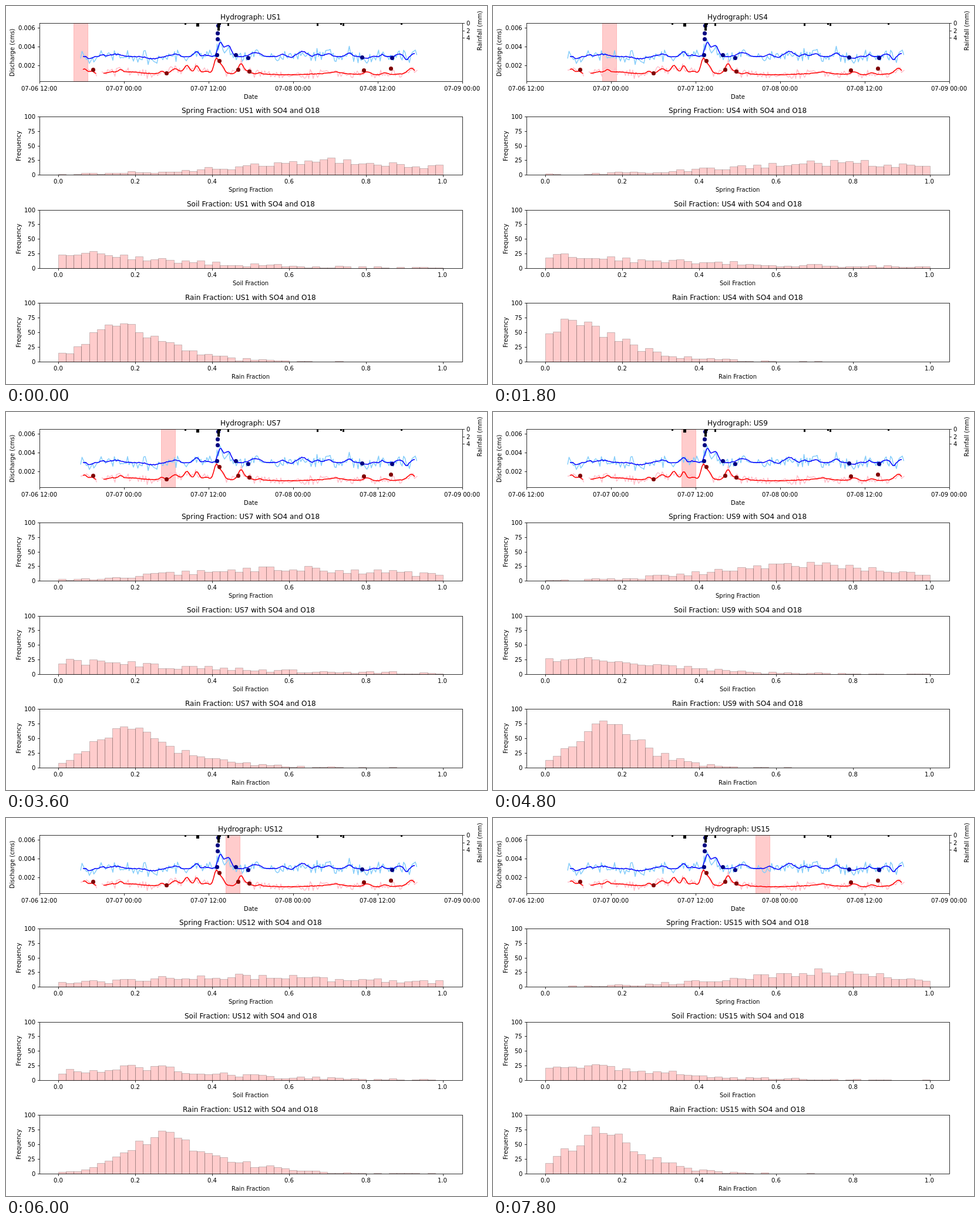
An HTML page with a canvas that plays this animation: 819 px wide and 643 px high, repeating every 8000 ms.

```html
<!DOCTYPE html>
<html lang="en">
<head>
<meta charset="utf-8">
<title>Hydrograph</title>
<style>
html, body { margin: 0; width: 100%; height: 100%; overflow: hidden; background: #fff; }
canvas { display: block; }
</style>
</head>
<body>
<canvas width="819" height="643"></canvas>
<script>
const ctx = document.querySelector('canvas').getContext('2d');
const LOOP = 8000, STEP = 600, BINS = 50;
const LEFT = 56.5, WIDTH = 720, HEIGHT = 99.2;
const chartTop = row => 29.25 + 158.7 * row;

// Key steps; the steps between them are interpolated
const keySteps = [0, 2, 5, 8, 10, 12, 13];
const bandX = [[115], [162], [235], [321], [374], [426], [447]];

// Histogram humps at the key steps: peak position, peak count, left and right width
const charts = [
  { name: 'Spring', humps: [
    [.74, 23, .28, .45], [.93, 22, .33, .2], [.6, 19, .33, .5], [.69, 27, .25, .37],
    [.5, 18, .32, .55], [.66, 25, .28, .33], [.74, 25, .25, .33]] },
  { name: 'Soil', humps: [
    [.06, 26, .07, .32], [.05, 20, .08, .48], [.02, 19, .1, .55], [.13, 28, .2, .24],
    [.24, 21, .25, .28], [.12, 30, .1, .2], [.12, 27, .12, .25]] },
  { name: 'Rain', humps: [
    [.17, 70, .087, .135], [.04, 74, .1, .13], [.19, 62, .085, .18], [.18, 78, .1, .1],
    [.28, 64, .1, .17], [.26, 79, .095, .125], [.16, 76, .09, .115]] }];

// Smoothed discharge: a base level with bumps of x, height, width
const blueFlow = bumps(86, [
  [143, -4, 5], [163, 3, 4], [185, 4, 14], [250, -4, 12], [288, 4, 10], [324, 9, 6],
  [340, 3, 6], [365, 23, 6], [378, 19, 7.5], [425, 7, 12], [470, 4, 6], [486, -2, 3],
  [505, 9, 10], [530, 4, 6], [548, 5, 8], [584, 6, 7], [612, -3, 8], [640, 4, 4],
  [670, 5, 7], [682, -6, 4], [695, 5, 6]]);
const redFlow = bumps(115, [
  [133, 8, 7], [146, 4, 5], [180, 3, 9], [195, 6, 6], [213, 3, 18], [265, 4, 5],
  [288, 8, 9], [308, 14, 7], [325, 14, 5], [340, 4, 8], [358, 25, 5.5], [367, 14, 6],
  [400, 17, 6.5], [412, 4, 6], [432, 2, 4], [480, -2, 40], [560, 3, 14], [615, 5, 8],
  [630, -2, 40], [645, 3, 6], [690, 9, 9]]);

const blueDots = [[361, 33], [360, 46], [360, 56], [359, 83], [391, 83], [412, 88], [606, 87], [657, 88]];
const redDots = [[148, 108], [273, 114], [363, 93], [395, 108], [414, 111], [609, 109], [655, 106]];
const rainBars = [
  [304, 3, 3], [324, 5, 6], [360, 4, 13], [363, 3, 3], [377, 3, 5],
  [529, 3, 5], [569, 3, 3], [573, 3, 5], [672, 3, 3]];

const curves = [
  ['#87cefa', trace(blueFlow, 127, 701, 13, 4)],
  ['#ffc0cb', trace(redFlow, 127, 156, 9, 8)],
  ['#ffc0cb', trace(redFlow, 163, 701, 9, 15)],
  ['#0000ff', trace(blueFlow, 131, 698, 1.2, 16)],
  ['#ff0000', trace(redFlow, 131, 154, .6, 5)],
  ['#ff0000', trace(redFlow, 166, 698, .6, 6)]];

function random(seed) {
  return () => {
    seed = (seed + 0x6D2B79F5) | 0;
    let t = Math.imul(seed ^ (seed >>> 15), 1 | seed);
    t = (t + Math.imul(t ^ (t >>> 7), 61 | t)) ^ t;
    return ((t ^ (t >>> 14)) >>> 0) / 4294967296;
  };
}

function bumps(base, list) {
  return x => list.reduce((y, [at, h, w]) => y - h * Math.exp(-(((x - at) / w) ** 2)), base);
}

function trace(flow, from, to, noise, seed) {
  const next = random(seed), points = [];
  for (let x = from; x <= to; x += 2.5) {
    points.push([x, flow(x) + (next() + next() - 1) * noise]);
  }
  return points;
}

function atStep(rows, step) {
  const b = keySteps.findIndex(k => k >= step), a = Math.max(0, b - 1);
  const p = b ? (step - keySteps[a]) / (keySteps[b] - keySteps[a]) : 0;
  return rows[a].map((v, i) => v + (rows[b][i] - v) * p);
}

// Places the inked box of the label on whole pixels
function text(label, x, y, align = .5, size = 10) {
  ctx.font = `${size}px "DejaVu Sans", sans-serif`;
  ctx.fillStyle = '#000';
  const ink = ctx.measureText(label);
  const before = Math.ceil(ink.actualBoundingBoxLeft);
  const width = before + Math.ceil(ink.actualBoundingBoxRight);
  ctx.fillText(label, Math.round(x - width * align) + before, Math.round(y));
}

function sideText(label, x, y) {
  ctx.save();
  ctx.translate(x, Math.round(y));
  ctx.rotate(-Math.PI / 2);
  text(label, 0, 0);
  ctx.restore();
}

function line(points, color, width) {
  ctx.beginPath();
  points.forEach(p => ctx.lineTo(...p));
  ctx.strokeStyle = color;
  ctx.lineWidth = width;
  ctx.stroke();
}

function dots(points, color) {
  ctx.fillStyle = color;
  for (const [x, y] of points) {
    ctx.beginPath();
    ctx.arc(x + .5, y + .5, 3.5, 0, 7);
    ctx.fill();
  }
}

const snap = v => Math.round(v) + .5;

function axes(top, title, xLabel, xTicks, yTicks) {
  const bottom = top + HEIGHT, middle = LEFT + WIDTH / 2;
  ctx.strokeStyle = '#000';
  ctx.lineWidth = .8;
  ctx.strokeRect(snap(LEFT), snap(top), WIDTH, snap(bottom) - snap(top));
  for (const [label, x] of xTicks) {
    line([[snap(x), snap(bottom)], [snap(x), snap(bottom) + 3.5]], '#000', .8);
    text(label, x, bottom + 15.1);
  }
  for (const [label, y] of yTicks) {
    line([[snap(LEFT), snap(y)], [snap(LEFT) - 3.5, snap(y)]], '#000', .8);
    text(label, LEFT - 7, snap(y) + 3.5, 1);
  }
  text(title, middle, top - 5.8, .5, 12);
  text(xLabel, middle, bottom + 29.2);
}

function drawHydrograph(step, sample) {
  const top = chartTop(0), right = LEFT + WIDTH;
  const band = Math.round(atStep(bandX, step)[0]) + .5;
  ctx.save();
  ctx.beginPath();
  ctx.rect(57, 29, WIDTH, 100);
  ctx.clip();
  ctx.fillStyle = ctx.strokeStyle = 'rgba(255,0,0,.2)';
  ctx.lineWidth = 1;
  ctx.fillRect(band, 29, 24, 100);
  ctx.strokeRect(band, 28, 24, 102);
  ctx.lineJoin = 'round';
  for (const [color, points] of curves) line(points, color, 1.5);
  dots(blueDots, '#000080');
  dots(redDots, '#800000');
  ctx.fillStyle = '#000';
  for (const [x, w, h] of rainBars) ctx.fillRect(x, 29, w, h);
  ctx.restore();

  const dates = ['07-06 12:00', '07-07 00:00', '07-07 12:00', '07-08 00:00', '07-08 12:00', '07-09 00:00'];
  axes(top, `Hydrograph: ${sample}`, 'Date',
    dates.map((date, i) => [date, LEFT + i * WIDTH / 5]),
    [['0.002', 101], ['0.004', 69], ['0.006', 37]]);
  sideText('Discharge (cms)', 14, top + HEIGHT / 2);
  for (const mm of [0, 2, 4]) {
    const y = snap(top + mm * 6.2);
    line([[snap(right), y], [snap(right) + 3.5, y]], '#000', .8);
    text(mm, right + 7, y + 3.5, 0);
  }
  sideText('Rainfall (mm)', 810, 41.5);
}

function histogram([peak, height, left, right], seed) {
  const next = random(seed);
  return Array.from({ length: BINS }, (_, bin) => {
    const d = (bin + .5) / BINS - peak;
    const value = height * Math.exp(d < 0 ? -((d / left) ** 2) / 2 : -((d / right) ** 1.2));
    return Math.max(0, Math.round(value + (next() - .5) * Math.sqrt(value) * 2.4));
  });
}

function drawChart({ name, humps }, row, step, sample) {
  const top = chartTop(row), bottom = top + HEIGHT;
  const x0 = LEFT + WIDTH / 22, span = WIDTH / 1.1;
  const edge = i => Math.ceil(x0 + i * span / BINS - .5) + .5;
  const level = v => bottom - v * HEIGHT / 100;
  ctx.fillStyle = 'rgba(255,0,0,.2)';
  ctx.strokeStyle = 'rgba(0,0,0,.2)';
  ctx.lineWidth = 1;
  histogram(atStep(humps, step), step * 1000 + row).forEach((count, i) => {
    if (!count) return;
    const y = snap(level(count));
    const box = [edge(i), y, edge(i + 1) - edge(i), snap(bottom) - y];
    ctx.fillRect(...box);
    ctx.strokeRect(...box);
  });
  axes(top, `${name} Fraction: ${sample} with SO4 and O18`, `${name} Fraction`,
    [0, .2, .4, .6, .8, 1].map(v => [v.toFixed(1), x0 + v * span]),
    [0, 25, 50, 75, 100].map(v => [v, level(v)]));
  sideText('Frequency', 25, top + HEIGHT / 2);
}

let shown = -1;
function frame(now) {
  const step = Math.floor(now % LOOP / STEP);
  if (step !== shown) {
    shown = step;
    const sample = `US${step < 10 ? step + 1 : step + 2}`;
    ctx.fillStyle = '#fff';
    ctx.fillRect(0, 0, 819, 643);
    drawHydrograph(step, sample);
    charts.forEach((chart, i) => drawChart(chart, i + 1, step, sample));
  }
  requestAnimationFrame(frame);
}
frame(0);
</script>
</body>
</html>
```
